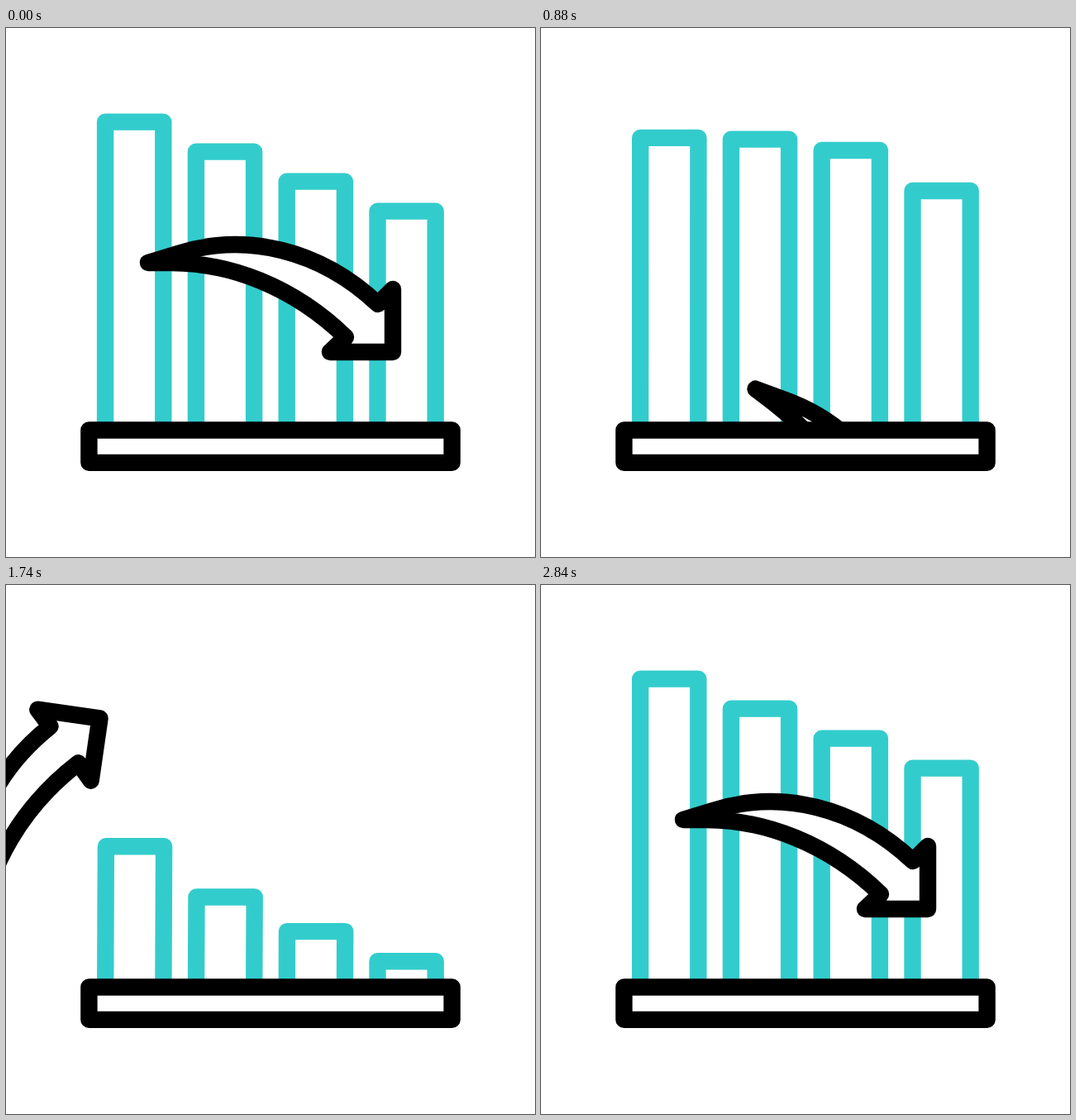
These frames come from a looping animation (640x640 px, 3000 ms). An HTML page:

```html
<!DOCTYPE html>
<html lang="en">
<head>
<meta charset="utf-8">
<title>Falling bar chart</title>
<style>
  html, body { margin: 0; width: 100%; height: 100%; overflow: hidden; background: #fff; }
  svg { display: block; width: 100vw; height: 100vh; }
  path, rect { stroke-width: 20.4; stroke-linejoin: round; stroke-linecap: round; }
  .bar { fill: none; stroke: #33cccc; }
  .ink { fill: #fff; stroke: #000; }
</style>
</head>
<body>
<svg viewBox="0 0 640 640">
  <defs>
    <clipPath id="above"><rect x="0" y="0" width="640" height="487"/></clipPath>
  </defs>
  <g clip-path="url(#above)">
    <g id="bars"></g>
    <path id="arrow" class="ink" d="M172 284 L208 273 C290 247 380 268 450 334 L468 316 V392 H392 L411 374 C347 312 270 284 200 284 Z"/>
  </g>
  <rect class="ink" x="100.4" y="486.5" width="439.2" height="39.4"/>
</svg>
<script>
const LOOP = 3000, STEP = 20, STRETCH = 38;
const PIVOT = "165 505";

// When each bar is fully down, starts back up, passes its rest height, and by how much
const bars = [
  { down: 1470, back: 1450, top: 2090, over: 38 },
  { down: 1389, back: 1430, top: 2265, over: 38 },
  { down: 1452, back: 1488, top: 2310, over: 38 },
  { down: 1441, back: 1458, top: 2643, over: 20 }
];

const group = document.getElementById("bars");
const arrow = document.getElementById("arrow");
for (const bar of bars) {
  bar.path = document.createElementNS("http://www.w3.org/2000/svg", "path");
  bar.path.setAttribute("class", "bar");
  group.append(bar.path);
}

// Eased progress from 0 to 1 between two times; lag above 1 delays the start
function ease(t, from, to, lag = 1) {
  const s = Math.min(1, Math.max(0, (t - from) / (to - from))) ** lag;
  return s * s * (3 - 2 * s);
}

// Downward offset of a bar's top from rest
function barOffset(bar, i, t) {
  const depth = 384 - 36 * i;
  if (t < bar.back) {
    const peak = 410 + 200 * i;
    return (STRETCH + depth) * ease(t, peak, bar.down, 1.8) - STRETCH * ease(t, peak - 325, peak);
  }
  return depth - (depth + bar.over) * ease(t, bar.back, bar.top)
    + bar.over * ease(t, bar.top, 2255 + 195 * i);
}

// Angle and shift: swing back, dive behind the base, then return from the left
function arrowPose(t) {
  if (t < 1200) {
    const windUp = ease(t, 0, 520), dive = ease(t, 520, 1100);
    return [115.5 * dive - 41 * windUp, -47 * dive - 13 * windUp, 129 * dive + 16 * windUp];
  }
  const left = 1 - ease(t, 1450, 2150, 1.254);
  return [-110 * left, 23 * left, -37 * left];
}

function draw(t) {
  bars.forEach((bar, i) => {
    const offset = barOffset(bar, i, t);
    const x = 120.1 + 109.8 * i;
    const top = 113.6 + 36 * i + offset;
    const lean = Math.max(0, offset) * 0.004 * (1 - i / 3);
    bar.path.setAttribute("d", `M${x} 510 L${x + lean} ${top} h70.2 L${x + 70.2} 510`);
  });
  const [angle, dx, dy] = arrowPose(t);
  arrow.setAttribute("transform", `translate(${dx} ${dy}) rotate(${angle} ${PIVOT})`);
}

const start = performance.now();
function tick() {
  const t = (performance.now() - start) % LOOP;
  draw(Math.floor(t / STEP) * STEP);
  requestAnimationFrame(tick);
}
tick();
</script>
</body>
</html>
```
